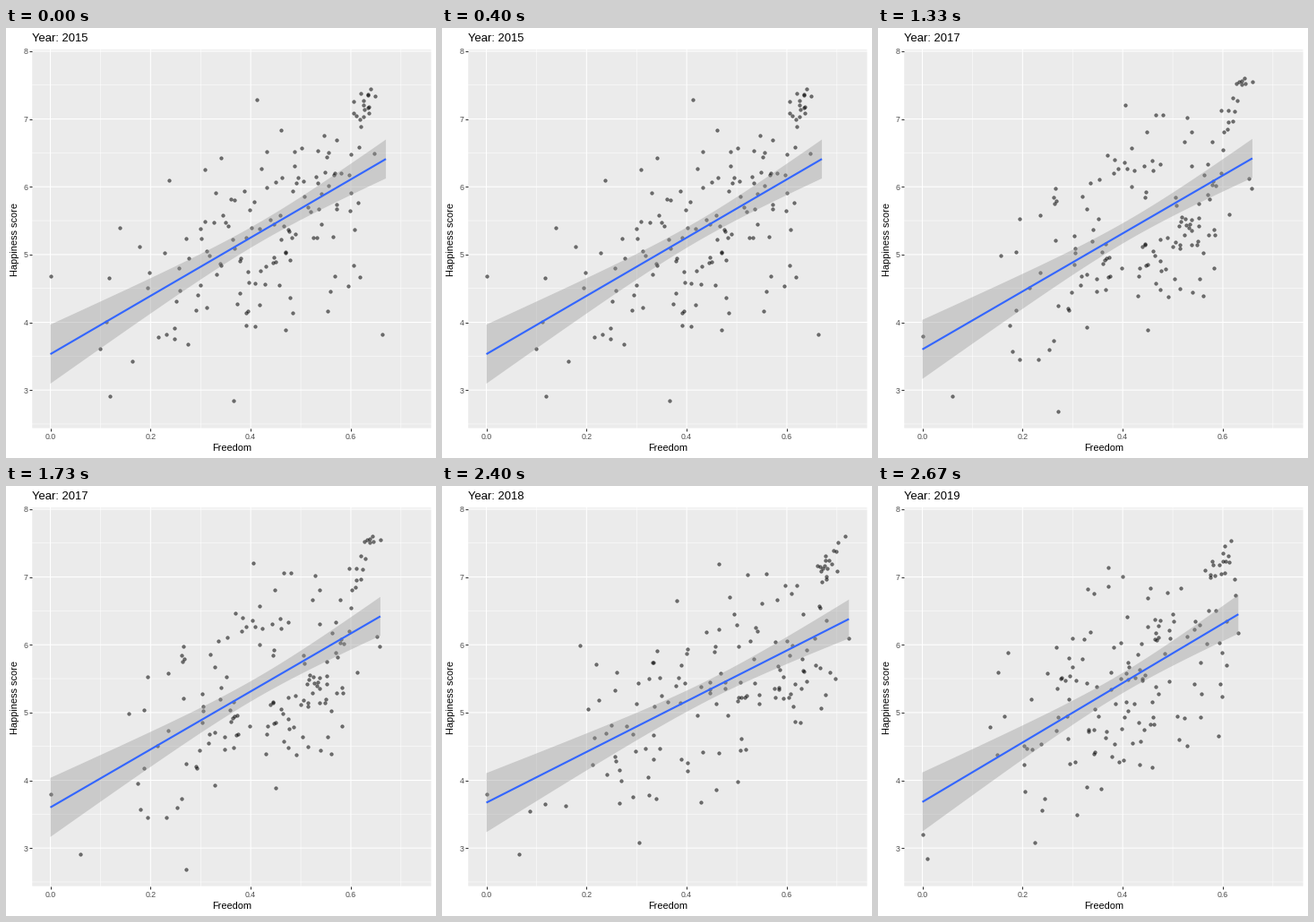
A matplotlib script for the animation above (3330 ms loop, 480x480 px).

```python
import numpy as np
import matplotlib.pyplot as plt
from matplotlib.animation import FuncAnimation
from matplotlib.patches import Polygon

plt.rcParams["font.family"] = "Liberation Sans"

SIZE, DPI = 480, 72
LEFT, RIGHT, TOP, BOTTOM = 29.3, 474.5, 24.2, 446.6
LOOP, STEP = 3330, 30
FIRST_YEAR = 2015
COUNTRIES = 155

# Per year: greatest freedom, then the trend's score at both ends.
TRENDS = [
    (0.670, 3.53, 6.41),
    (0.609, 3.73, 6.44),
    (0.659, 3.60, 6.42),
    (0.724, 3.67, 6.38),
    (0.631, 3.68, 6.45),
]

# Per year: the few countries at the edges of the crowd.
EXTREMES = [
    [(0, 4.68), (0.118, 2.91), (0.365, 2.84), (0.413, 7.28), (0.662, 3.82)],
    [(0, 4.14), (0.043, 2.91), (0.347, 3.30), (0.364, 7.27), (0.609, 5.99)],
    [(0, 3.80), (0.060, 2.91), (0.271, 2.69), (0.406, 7.21), (0.658, 5.97)],
    [(0, 3.80), (0.065, 2.91), (0.305, 3.08), (0.464, 7.19), (0.724, 6.10)],
    [(0, 3.20), (0.010, 2.85), (0.225, 3.08), (0.371, 7.14), (0.631, 6.17)],
]

# Half-height of the confidence band: left end, narrowest, right end.
BAND_LEFT, BAND_MIN, BAND_RIGHT = 0.436, 0.149, 0.287


def trend_at(year, x):
    x_max, start, end = TRENDS[year]
    return start + (end - start) * x / x_max


def band(year):
    x = np.linspace(0, TRENDS[year][0], 80)
    left = np.sqrt(BAND_LEFT ** 2 - BAND_MIN ** 2)
    right = np.sqrt(BAND_RIGHT ** 2 - BAND_MIN ** 2)
    half = np.hypot(BAND_MIN, np.linspace(-left, right, x.size))
    y = trend_at(year, x)
    return np.vstack([np.column_stack([x, y + half]),
                      np.column_stack([x, y - half])[::-1]])


def countries(year):
    """Extremes, a tight group of happy countries and a crowd along the trend."""
    rng = np.random.default_rng(FIRST_YEAR + year)
    x_max = TRENDS[year][0]

    happy = 16
    rise = rng.normal(0, 1, happy)
    happy_x = x_max - 0.036 + 0.012 * (rise + rng.normal(0, 1, happy))
    happy_y = np.minimum(7.25 + 0.22 * rise, 7.6)
    group = np.column_stack([np.minimum(happy_x, x_max), happy_y])

    x = x_max * rng.beta(3.2, 1.8, 4 * COUNTRIES)
    gap = rng.normal(-0.08, 0.93, x.size)
    y = trend_at(year, x) + gap
    keep = (x > 0.08) & (abs(gap) < 1.75) & (y > 3.3) & (y < 7.1)
    crowd = np.column_stack([x, y])[keep]
    return np.vstack([EXTREMES[year], group, crowd])[:COUNTRIES]


fig = plt.figure(figsize=(SIZE / DPI, SIZE / DPI), dpi=DPI, facecolor="white")
ax = fig.add_axes([LEFT / SIZE, 1 - BOTTOM / SIZE,
                   (RIGHT - LEFT) / SIZE, (BOTTOM - TOP) / SIZE],
                  facecolor="#EBEBEB")
ax.patch.set_snap(False)
ax.spines[:].set_visible(False)
ax.set(xlim=(-0.0362, 0.7602), ylim=(2.439, 8.0228))

ax.set_xticks(np.arange(0, 0.7, 0.2))
ax.set_xticks(np.arange(0.1, 0.8, 0.2), minor=True)
ax.set_yticks(range(3, 9))
ax.set_yticks(np.arange(2.5, 8), minor=True)
ax.set_axisbelow(True)
ax.grid(which="major", color="white", lw=1.07, snap=False)
ax.grid(which="minor", color="white", lw=0.53, snap=False)
ax.tick_params(which="minor", length=0)
ax.tick_params(which="major", length=2.75, width=1.07, pad=2.3,
               color="#333333", labelcolor="#4D4D4D", labelsize=8.8)


def label(x, y, text, size, **style):
    return fig.text(x / SIZE, 1 - y / SIZE, text, size=size, **style)


title = label(LEFT, 15, "", 13, va="baseline")
label((LEFT + RIGHT) / 2, 472, "Freedom", 11, ha="center", va="baseline")
label(10.2, (TOP + BOTTOM) / 2 + 0.5, "Happiness score", 11, rotation=90,
      ha="center", va="center")

dots = ax.scatter([], [], s=3.5 ** 2, c="black", edgecolors="black",
                  linewidths=0.71, alpha=0.5, zorder=2)
ribbon = ax.add_patch(Polygon(band(0), fc="#999999", ec="none",
                              alpha=0.4, zorder=3))
trend, = ax.plot([], [], color="#3366FF", lw=2.13, zorder=4,
                 solid_capstyle="butt")


def update(tick):
    # Each year holds a fifth of the loop, rounded to the clock's steps.
    year = int((tick * STEP + 18) * len(TRENDS) / LOOP) % len(TRENDS)
    x_max, start, end = TRENDS[year]
    title.set_text(f"Year: {FIRST_YEAR + year}")
    dots.set_offsets(countries(year))
    ribbon.set_xy(band(year))
    trend.set_data([0, x_max], [start, end])
    return title, dots, ribbon, trend


anim = FuncAnimation(fig, update, frames=LOOP // STEP, interval=STEP,
                     repeat=True)
plt.show()
```
